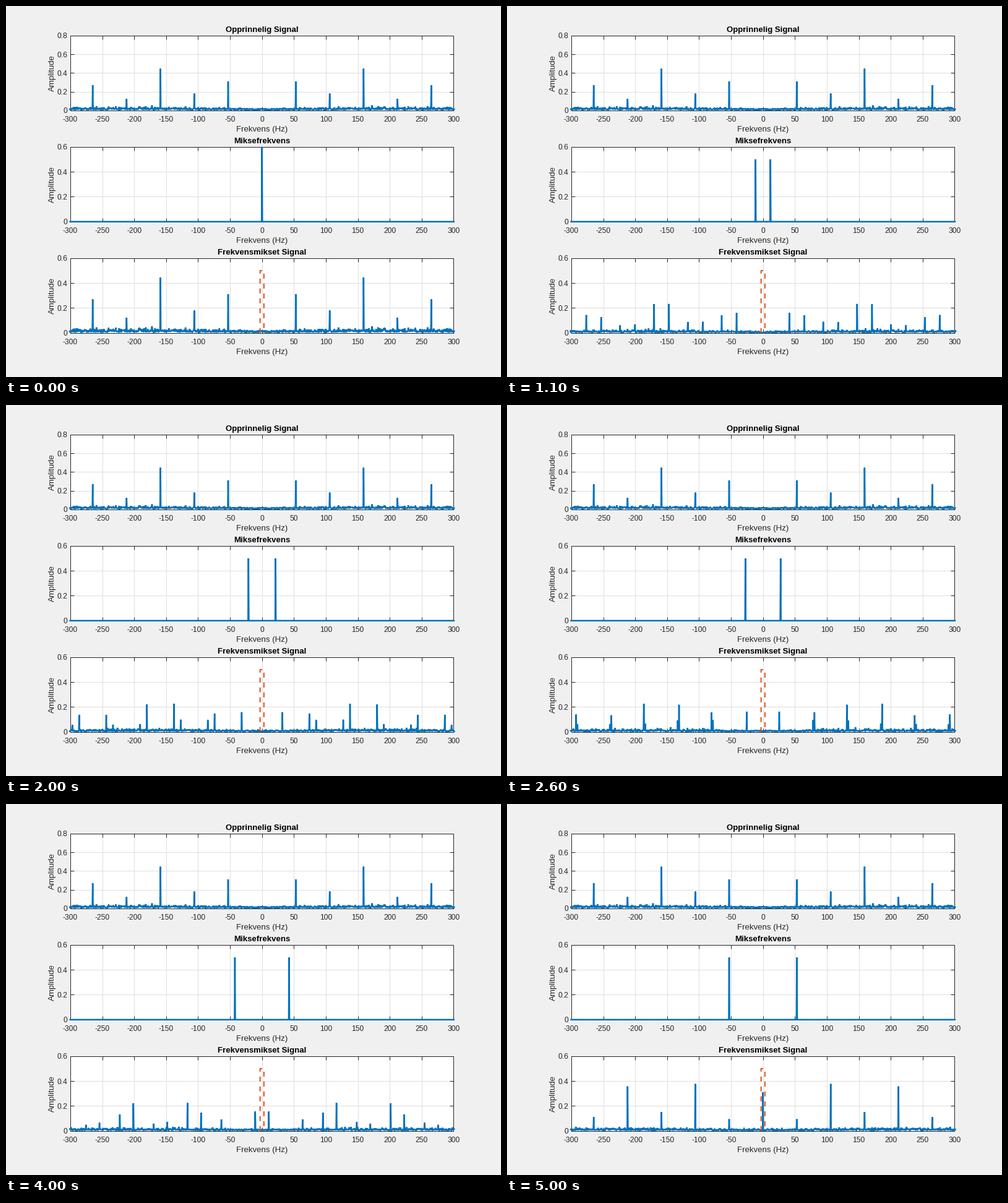
Animation of 800 by 600 pixels, one loop 7200 ms. Source, as a matplotlib script:

```python
import numpy as np
import matplotlib.pyplot as plt
from matplotlib.animation import FuncAnimation

W, H, DPI = 800, 600, 100
PX = 72 / DPI                      # points per pixel
LEFT, RIGHT, HEIGHT = 104, 723.45, 121
BLUE, ORANGE, INK = "#0072BD", "#D95319", "#262626"

BIN = 0.53                         # Hz per spectrum bin
TONE = 100                         # bin of the fundamental, 53 Hz
STEP, SWEEP = 2, 100               # mixer bins per frame, and in total
SHOWN, REACH = 569, 670            # bins drawn / computed on each side

plt.rcParams.update({
    "font.family": "Liberation Sans",
    "path.simplify": False,
    "lines.solid_joinstyle": "bevel",
    "lines.solid_capstyle": "butt",
    "lines.dash_capstyle": "butt",
})


def make_spectrum():
    """Two-sided spectrum of a 53 Hz tone with harmonics in noise."""
    rng = np.random.default_rng(12)
    k = np.arange(REACH + 1)
    sigma = np.where(k < TONE, 0.010, 0.013)
    half = sigma * (rng.normal(size=k.size) + 1j * rng.normal(size=k.size))
    half *= np.minimum(1, 0.038 / np.abs(half))
    bumps = {120: 0.044, 172: 0.054, 182: 0.045, 192: 0.043,
             229: 0.043, 240: 0.041, 259: 0.045}
    for freq, level in bumps.items():
        i = round(freq / BIN)
        half[i] *= level / abs(half[i])
    half[0] = 0.01
    for n, level in enumerate([0.31, 0.18, 0.445, 0.123, 0.27, 0.1], 1):
        half[n * TONE] = level
    return np.concatenate([half[:0:-1].conj(), half])


SPECTRUM = make_spectrum()
BINS = np.arange(-SHOWN, SHOWN + 1)
FREQS = BINS * BIN


def mixed(shift):
    centre = BINS + REACH
    return np.abs(SPECTRUM[centre - shift] + SPECTRUM[centre + shift]) / 2


def mixer(shift):
    return 0.5 * (BINS == shift) + 0.5 * (BINS == -shift)


fig = plt.figure(figsize=(W / DPI, H / DPI), dpi=DPI, facecolor="#f0f0f0")


def label(x, y, text, size=13.2, color=INK, **style):
    style = {"ha": "center", "va": "baseline", **style}
    fig.text(x / W, 1 - y / H, text, fontsize=size * PX, color=color, **style)


def panel(top, title, ymax):
    bottom = top + HEIGHT
    ax = fig.add_axes([LEFT / W, 1 - bottom / H, (RIGHT - LEFT) / W, HEIGHT / H])
    xticks = np.arange(-300, 301, 50)
    yticks = np.arange(0, ymax + 0.1, 0.2)
    ax.set(xlim=(-300, 300), ylim=(0, ymax), xticks=xticks, yticks=yticks)
    ax.set_axisbelow(True)
    ax.grid(color="#dfdfdf", lw=PX)
    ax.tick_params(direction="in", top=True, right=True, length=6 * PX,
                   width=PX, color=INK, labelbottom=False, labelleft=False)
    for spine in ax.spines.values():
        spine.set(color=INK, linewidth=PX, zorder=1.5)

    mid = (LEFT + RIGHT) / 2
    for v in xticks:
        label(mid + v * (RIGHT - LEFT) / 600, bottom + 18, f"{v:g}", 12)
    for v in yticks:
        label(99.5, bottom - v / ymax * HEIGHT + 4.5, f"{v:g}", 12, ha="right")
    label(mid, top - 5.5, title, color="black", weight="bold")
    label(mid, bottom + 34.5, "Frekvens (Hz)")
    label(78, top + HEIGHT / 2, "Amplitude", rotation=90, rotation_mode="anchor")

    line, = ax.plot(FREQS, 0 * FREQS, color=BLUE, lw=2.5 * PX,
                    clip_on=False, snap=False, zorder=3)
    return ax, line


_, source_line = panel(47.8, "Opprinnelig Signal", 0.8)
_, mixer_line = panel(227.8, "Miksefrekvens", 0.6)
mix_ax, mixed_line = panel(407.8, "Frekvensmikset Signal", 0.6)

source_line.set_ydata(np.abs(SPECTRUM[BINS + REACH]))
mix_ax.plot([-3, -3, 3, 3], [0, 0.5, 0.5, 0], color=ORANGE, lw=2 * PX,
            ls=(0, (4, 4)), dash_joinstyle="bevel", clip_on=False,
            snap=False, zorder=4)


def update(i):
    shift = min(i * STEP, SWEEP)   # sweep, then hold
    mixer_line.set_ydata(np.minimum(mixer(shift), 0.6))
    mixed_line.set_ydata(mixed(shift))
    return mixer_line, mixed_line


update(0)
anim = FuncAnimation(fig, update, frames=72, interval=100, repeat=True,
                     repeat_delay=0)
plt.show()
```
